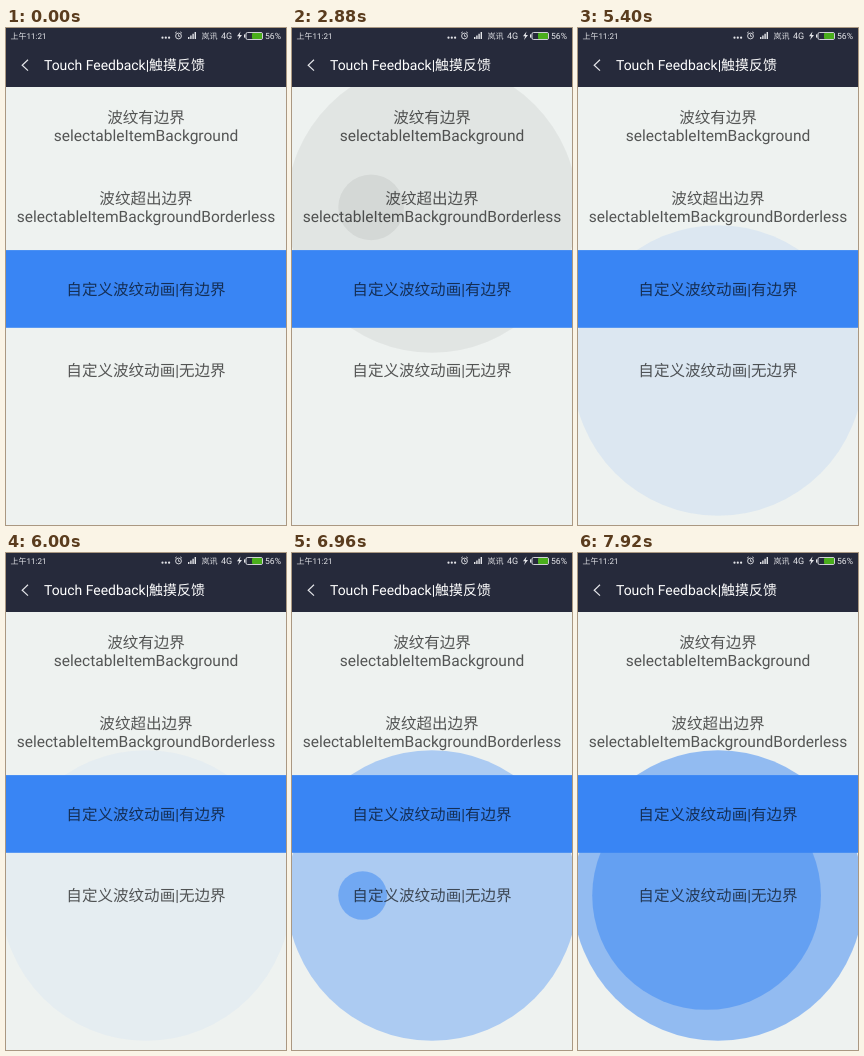
Recreate the animation shown at these times as an HTML page. Size 280 by 497 pixels, loop 8000 ms.

```html
<!DOCTYPE html>
<html lang="zh-CN">
<head>
<meta charset="utf-8">
<title>Touch Feedback</title>
<style>
  html, body { margin: 0; width: 100%; height: 100%; overflow: hidden; background: #eef2f0; }
  svg { display: block; width: 100%; height: 100%; font-family: Roboto, "Noto Sans CJK SC", "Noto Sans CJK", sans-serif; }
  text { text-rendering: geometricPrecision; }
  #labels { font-size: 15.56px; text-anchor: middle; fill: rgba(0, 0, 0, .65); }
  .status { font-size: 8.6px; fill: #e4e5e9; }
  .line { fill: none; stroke: #e4e5e9; }
</style>
</head>
<body>
<svg viewBox="0 0 280 497">
  <rect width="280" height="497" fill="#eef2f0"/>
  <g id="ripples"></g>
  <rect y="222.1" width="280" height="77.7" fill="#3985f4"/>
  <g id="labels"></g>

  <rect width="280" height="59" fill="#262a3b"/>
  <path class="line" d="M22 31.8 L16.2 37.2 L22 42.6" stroke-width="1.2"/>
  <text x="38" y="42.3" font-size="13.95" fill="#fff">Touch Feedback|触摸反馈</text>

  <g class="status">
    <text x="4.5" y="11" font-size="8">上午11:21</text>
    <circle cx="156.5" cy="9.7" r="1.1"/>
    <circle cx="159.8" cy="9.7" r="1.1"/>
    <circle cx="163.1" cy="9.7" r="1.1"/>
    <circle class="line" cx="172.5" cy="8" r="2.9" stroke-width=".9"/>
    <path class="line" d="M172.5 6.3 V8.3 H174 M169 5.2 L170.8 3.8 M176 5.2 L174.2 3.8" stroke-width=".8"/>
    <path d="M182 9h1.4v2h-1.4z M184.2 7.5h1.4v3.5h-1.4z M186.4 5.8h1.4v5.2h-1.4z M188.6 4h1.4v7h-1.4z"/>
    <text x="195.5" y="11" font-size="8">岚讯</text>
    <text x="215" y="11.2" font-size="9">4G</text>
    <path d="M234.5 3.5 L231 8.3 H233.2 L232 12 L236 7 H233.7 Z"/>
    <rect x="238" y="6.4" width="1.3" height="3.2"/>
    <rect class="line" x="240" y="4.5" width="16.5" height="7" rx="1.5" stroke-width=".9"/>
    <rect x="246" y="5" width="10" height="6" rx="1" fill="#4aae1c"/>
    <text x="259" y="11.2">56%</text>
  </g>
</svg>

<script>
const LOOP = 8000, STEP = 120;
const CENTER_X = 140, FIRST_ROW = 97.85, ROW_GAP = 81.55, LINE_HEIGHT = 18.1;
const RADIUS = Math.hypot(140, 38.9);

// Timing of the touch ripple, in ms
const HALO_IN = 500, HALO_OUT = 480, WAVE_DELAY = 100, WAVE_IN = 1550, WAVE_OUT = 320;
const LEFTOVER = .1;

const rows = [
  ['波纹有边界', 'selectableItemBackground'],
  ['波纹超出边界', 'selectableItemBackgroundBorderless'],
  ['自定义波纹动画|有边界'],
  ['自定义波纹动画|无边界']
];

const ripples = [
  {
    row: 1, color: '#000', alpha: .06, touchX: 59,
    presses: [{ down: 620, up: 1200 }, { down: 1860, up: 2100 }, { down: 2430, up: 4560 }]
  },
  {
    row: 3, color: '#3985f4', alpha: .5, touchX: 55,
    presses: [{ down: 5300, up: 5540 }, { down: 6600, up: LOOP }]
  }
];

const clamp = x => Math.max(0, Math.min(1, x));
const easeOut = x => 1 - (1 - x) ** 3;
const rowCenter = row => FIRST_ROW + row * ROW_GAP;

function add(parentId, tag, attributes, text = '') {
  const node = document.createElementNS('http://www.w3.org/2000/svg', tag);
  setAll(node, attributes);
  node.textContent = text;
  return document.getElementById(parentId).appendChild(node);
}

function setAll(node, attributes) {
  for (const [name, value] of Object.entries(attributes)) node.setAttribute(name, value);
}

rows.forEach((lines, row) => lines.forEach((line, i) => {
  const y = rowCenter(row) + 5.9 + (i - (lines.length - 1) / 2) * LINE_HEIGHT;
  add('labels', 'text', { x: CENTER_X, y }, line);
}));

for (const ripple of ripples) {
  const circle = { cx: CENTER_X, cy: rowCenter(ripple.row), r: RADIUS, fill: ripple.color };
  ripple.halo = add('ripples', 'circle', circle);
  ripple.wave = add('ripples', 'circle', circle);
}

// A short press fades out to a faint leftover; a fully grown one vanishes on release.
function pressState({ down, up }, t) {
  const grownAt = time => clamp((time - down - WAVE_DELAY) / WAVE_IN);
  const held = grownAt(Math.min(t, up));
  if (t >= up && held === 1) return { halo: 0, size: 1, wave: 0 };

  const exit = clamp((t - up) / WAVE_OUT);
  const rise = clamp((t - down) / HALO_IN);
  const fall = 1 - clamp((t - up) / HALO_OUT);
  return {
    halo: Math.max(LEFTOVER, Math.min(rise, fall)),
    size: held + (1 - held) * easeOut(exit),
    wave: 1 - exit
  };
}

function draw(t) {
  for (const { presses, alpha, touchX, halo, wave } of ripples) {
    const press = presses.filter(p => p.down <= t).pop();
    const state = press ? pressState(press, t) : { halo: 0, size: 0, wave: 0 };
    setAll(halo, { 'fill-opacity': alpha * state.halo });
    setAll(wave, {
      'fill-opacity': alpha * state.wave,
      r: RADIUS * state.size,
      cx: touchX + (CENTER_X - touchX) * clamp(1.1 * state.size)
    });
  }
}

const start = performance.now();
function tick() {
  const t = (performance.now() - start) % LOOP;
  draw(Math.floor(t / STEP) * STEP);
  requestAnimationFrame(tick);
}
tick();
</script>
</body>
</html>
```
